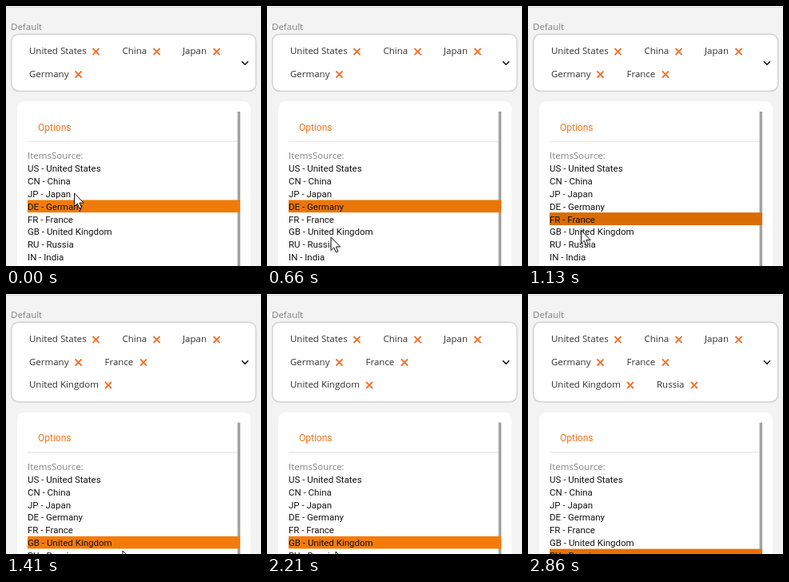
Recreate the animation shown at these times as an HTML page. Size 319 px wide and 325 px high, loop 3180 ms.

```html
<!DOCTYPE html>
<html lang="en">
<head>
<meta charset="utf-8">
<title>Multi-select list</title>
<style>
  html, body { margin: 0; width: 100%; height: 100%; overflow: hidden; background: #f3f3f3; }
  svg { display: block; width: 319px; height: 325px; }
  text { font: 11.5px "Open Sans", sans-serif; fill: #303030; }
  .item { font-family: Roboto, sans-serif; fill: #141414; }
  .label { fill: #808080; }
  .title { font: 12px Roboto, sans-serif; fill: #f4731c; }
  .cross { stroke: #f3722c; stroke-width: 1.8; fill: none; }
</style>
</head>
<body>
<svg viewBox="0 0 319 325">
  <defs>
    <radialGradient id="soft">
      <stop offset=".55" stop-color="#d96c05"/>
      <stop offset="1" stop-color="#d96c05" stop-opacity="0"/>
    </radialGradient>
    <clipPath id="rowClip"><rect id="clipBar" x="27" width="266" height="15.6"/></clipPath>
  </defs>
  <rect width="319" height="325" fill="#f3f3f3"/>
  <rect width="319" height="1" fill="#fafafa"/>
  <rect y="1" width="319" height="1.2" fill="#dcdcdc"/>
  <text class="label" x="6" y="30.3">Default</text>
  <rect id="box" x="6.7" y="35.2" width="306" rx="9" fill="#fff" stroke="#d2d2d2" stroke-width="1.5"/>
  <g id="tags"></g>
  <path id="chevron" d="M-4-2L0 2L4-2" fill="none" stroke="#111" stroke-width="1.6"/>
  <g id="panel">
    <rect x="14" y="119" width="292" height="260" rx="9" fill="#fff"/>
    <text class="title" x="40" y="155.8">Options</text>
    <rect x="27" y="168.7" width="266" height="1" fill="#e2e2e2"/>
    <text class="label" x="27" y="191.3">ItemsSource:</text>
    <rect x="289.6" y="132" width="3.5" height="240" fill="#a3a3a3"/>
    <rect id="bar" x="27" width="266" height="15.6"/>
    <g clip-path="url(#rowClip)"><circle id="ripple" cx="83" fill="url(#soft)"/></g>
    <g id="items"></g>
  </g>
  <path id="cursor" d="M0 0V16.5L3.8 12.9L6.4 18.9L9 17.8L6.4 12H11.6Z" fill="#fff" stroke="#111" stroke-width="1" stroke-linejoin="round"/>
</svg>
<script>
const LOOP = 3180, TICK = 46.8, PITCH = 15.8, SHIFT = 28.7;
const $ = id => document.getElementById(id);

function add(parent, tag, attrs, content = '') {
  const el = document.createElementNS('http://www.w3.org/2000/svg', tag);
  for (const k in attrs) el.setAttribute(k, attrs[k]);
  el.textContent = content;
  return parent.appendChild(el);
}
const set = (id, attrs) => {
  for (const k in attrs) $(id).setAttribute(k, attrs[k]);
};

const countries = ['US - United States', 'CN - China', 'JP - Japan', 'DE - Germany',
  'FR - France', 'GB - United Kingdom', 'RU - Russia', 'IN - India'];
countries.forEach((name, i) =>
  add($('items'), 'text', { class: 'item', x: 27, y: 207.3 + i * PITCH }, name));

// name, text x, cross x, line, tick at which it appears
const tags = [
  ['United States', 29, 112.5, 0, 0],
  ['China', 145.5, 188.5, 0, 0],
  ['Japan', 221, 263.5, 0, 0],
  ['Germany', 29, 90.5, 1, 0],
  ['France', 123.5, 172, 1, 16],
  ['United Kingdom', 29, 128, 2, 29],
  ['Russia', 161, 208, 2, 49]
].map(([name, x, cx, line, at]) => {
  const g = add($('tags'), 'g', {}), y = line * 28.5;
  add(g, 'text', { x, y: 60 + y }, name);
  add(g, 'path', { class: 'cross', d: `M${cx - 4} ${53 + y}l8 8m0-8l-8 8` });
  return { g, at };
});

// tick, row, bar colour, whether a dark ripple spreads over it
const picks = [
  [0, 3, '#ef7b09', false],
  [7, 3, '#ea7607', false],
  [16, 4, '#f27c08', true],
  [29, 5, '#f47b0b', false],
  [49, 6, '#e87006', false]
];

// tick, x, y
const path = [
  [0, 85.5, 234], [1, 85.5, 236], [6, 83, 261], [10, 83, 262], [14, 80, 289],
  [18, 79, 294], [21, 79, 294], [24, 66.5, 280.5], [27, 66.5, 280.5],
  [30, 146, 321], [34, 160, 350], [38, 86, 345], [40, 86, 324], [41, 86, 322],
  [48, 86, 322], [51, 86, 332], [68, 86, 345]
];

function cursorAt(n) {
  const i = path.findIndex(p => p[0] > n);
  const a = path[i < 0 ? path.length - 1 : i - 1], b = i < 0 ? a : path[i];
  const k = i < 0 ? 0 : (n - a[0]) / (b[0] - a[0]);
  return [a[1] + (b[1] - a[1]) * k, a[2] + (b[2] - a[2]) * k];
}

function draw(time) {
  const n = Math.floor((time % LOOP) / TICK);
  const grown = n >= 29;
  set('box', { height: grown ? 99.8 : 71.3 });
  set('chevron', { transform: `translate(299 ${grown ? 85.3 : 71.2})` });
  set('panel', { transform: `translate(0 ${grown ? SHIFT : 0})` });
  tags.forEach(t => t.g.setAttribute('visibility', n >= t.at ? 'visible' : 'hidden'));

  const [start, row, fill, spreads] = picks.filter(p => p[0] <= n).pop();
  const y = 242.5 + (row - 3) * PITCH;
  const spread = spreads ? Math.min(1, (n - start) / 5) : 0;
  set('bar', { y, fill });
  set('clipBar', { y });
  set('ripple', { cy: y + 8, r: 400 * spread });

  set('cursor', { transform: `translate(${cursorAt(n).join(' ')})` });
}

const begin = performance.now();
function loop() {
  draw(performance.now() - begin);
  requestAnimationFrame(loop);
}
loop();
</script>
</body>
</html>
```
